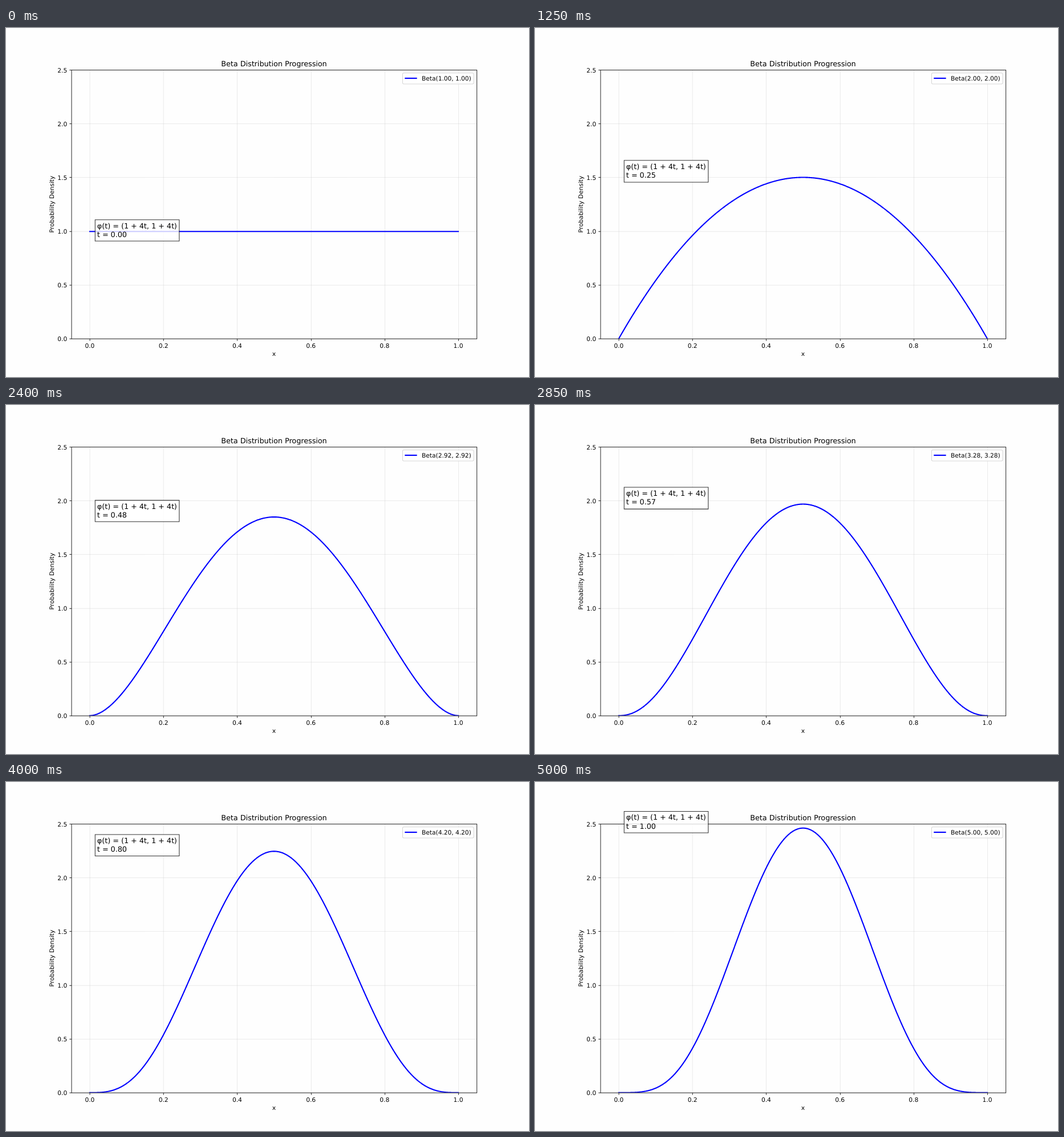
Animation of 917 by 611 pixels, one loop 5050 ms. Source, as an HTML page with a canvas:

```html
<!DOCTYPE html>
<html lang="en">
<head>
<meta charset="utf-8">
<title>Beta Distribution Progression</title>
<style>
  html, body { margin: 0; width: 100%; height: 100%; overflow: hidden; background: #fefefe; }
  canvas { display: block; width: 917px; height: 611px; }
</style>
</head>
<body>
<canvas id="stage" width="917" height="611"></canvas>
<script>
const ctx = document.getElementById("stage").getContext("2d");

// Layout units: a 12 x 8 inch figure at 100 dpi, scaled onto the stage.
const FIG = { w: 1200, h: 800 };
const AX = { left: 150, right: 1080, top: 96, bottom: 712 };
const PT = 100 / 72;
const SMALL = 10 * PT, LARGE = 12 * PT;
const STEP = 50, STEPS = 101, SAMPLES = 1000;

const px = x => AX.left + (AX.right - AX.left) * (x + 0.05) / 1.1;
const py = y => AX.bottom - (AX.bottom - AX.top) * y / 2.5;
const snap = v => Math.floor(v + 0.5) + 0.5;

function line(x1, y1, x2, y2, color, width) {
  ctx.strokeStyle = color;
  ctx.lineWidth = width;
  ctx.beginPath();
  ctx.moveTo(x1, y1);
  ctx.lineTo(x2, y2);
  ctx.stroke();
}

function text(str, x, y, size, align = "left") {
  ctx.font = `${size}px "DejaVu Sans", sans-serif`;
  ctx.textAlign = align;
  ctx.fillStyle = "#000";
  ctx.fillText(str, x, y);
}

function panel(x1, y1, x2, y2, radius, edge) {
  ctx.beginPath();
  ctx.roundRect(x1, y1, x2 - x1, y2 - y1, radius);
  ctx.fillStyle = "rgba(255,255,255,0.8)";
  ctx.fill();
  ctx.strokeStyle = edge;
  ctx.lineWidth = PT;
  ctx.stroke();
}

// B(a, a) by the midpoint rule with x = sin² θ
function betaFn(a) {
  const n = 2000, h = Math.PI / 2 / n;
  let sum = 0;
  for (let i = 0; i < n; i++) sum += (Math.sin(2 * (i + 0.5) * h) / 2) ** (2 * a - 1);
  return 2 * h * sum;
}

function drawGrid() {
  const color = "rgba(176,176,176,0.3)", w = 0.8 * PT;
  for (let i = 0; i <= 5; i++) {
    const x = snap(px(i / 5)), y = snap(py(i / 2));
    line(x, AX.top, x, AX.bottom, color, w);
    line(AX.left, y, AX.right, y, color, w);
  }
}

function drawCurve(a, norm) {
  ctx.save();
  ctx.beginPath();
  ctx.rect(AX.left, AX.top, AX.right - AX.left, AX.bottom - AX.top);
  ctx.clip();
  ctx.beginPath();
  for (let i = 0; i < SAMPLES; i++) {
    const x = i / (SAMPLES - 1);
    const y = py((x * (1 - x)) ** (a - 1) / norm);
    ctx.lineTo(px(x), a === 1 ? snap(y) : y);
  }
  ctx.strokeStyle = "#00f";
  ctx.lineWidth = 2 * PT;
  ctx.lineCap = "square";
  ctx.lineJoin = "round";
  ctx.stroke();
  ctx.restore();
}

function drawAxes() {
  const w = 0.8 * PT, tick = 3.5 * PT;
  ctx.strokeStyle = "#000";
  ctx.lineWidth = w;
  ctx.strokeRect(AX.left + 0.5, AX.top + 0.5, AX.right - AX.left, AX.bottom - AX.top);
  for (let i = 0; i <= 5; i++) {
    const x = snap(px(i / 5)), y = snap(py(i / 2));
    line(x, AX.bottom + 0.5, x, AX.bottom + 0.5 + tick, "#000", w);
    line(AX.left + 0.5 - tick, y, AX.left + 0.5, y, "#000", w);
    text((i / 5).toFixed(1), px(i / 5), 733, SMALL, "center");
    text((i / 2).toFixed(1), AX.left - 2 * tick, py(i / 2) + 5.5, SMALL, "right");
  }
  text("Beta Distribution Progression", 615, 88, LARGE, "center");
  text("x", 615, 752, SMALL, "center");
  ctx.save();
  ctx.translate(109.5, 404);
  ctx.rotate(-Math.PI / 2);
  text("Probability Density", 0, 0, SMALL, "center");
  ctx.restore();
}

function drawNote(t, level) {
  const x = px(0.02), y = py(level), base = Math.round(y) + 1;
  panel(204.5, snap(y - 39), 397.5, snap(y + 10.3), 0, "rgba(0,0,0,0.8)");
  text("φ(t) = (1 + 4t, 1 + 4t)", x, base - 20, LARGE);
  text("t = " + t.toFixed(2), x, base, LARGE);
}

function drawLegend(a) {
  const value = a.toFixed(2);
  panel(910, 103, 1073.1, 128.3, 2.8, "rgba(204,204,204,0.8)");
  line(915, 115.2, 943, 115.2, "#00f", 2 * PT);
  text(`Beta(${value}, ${value})`, 1067.5, 120, SMALL, "right");
}

function draw(step) {
  const t = step / (STEPS - 1), a = 1 + 4 * t;
  const norm = step ? betaFn(a) : 1;
  // The note rides on the peak, except on the flat first curve.
  const level = step ? 0.25 ** (a - 1) / norm : 0.95;
  ctx.setTransform(917 / FIG.w, 0, 0, 611 / FIG.h, 0, 0);
  ctx.textRendering = "geometricPrecision";
  ctx.fillStyle = "#fefefe";
  ctx.fillRect(0, 0, FIG.w, FIG.h);
  drawGrid();
  drawCurve(a, norm);
  drawAxes();
  drawNote(t, level);
  drawLegend(a);
}

let shown = -1;
function tick() {
  const step = Math.floor(performance.now() / STEP) % STEPS;
  if (step !== shown) draw(shown = step);
  requestAnimationFrame(tick);
}
tick();
</script>
</body>
</html>
```
